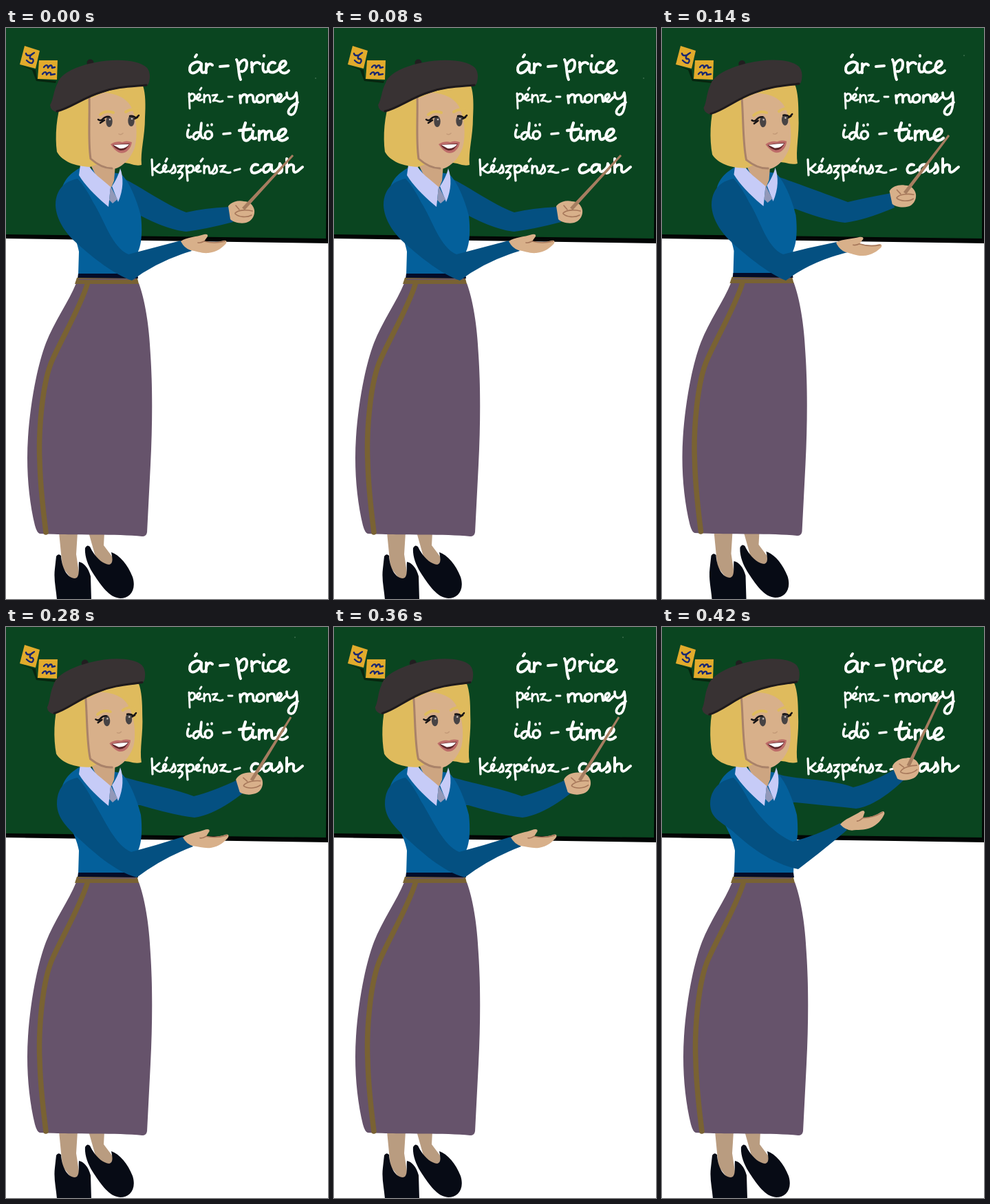
Write an HTML page that moves like this. It is 468 px wide and 830 px high and loops after 0.56 s.

```html
<!DOCTYPE html>
<html lang="hu">
<head>
<meta charset="utf-8">
<title>Vocabulary lesson</title>
<style>
  html, body { margin: 0; width: 100%; height: 100%; overflow: hidden; background: #fff; }
  svg { display: block; width: 100vw; height: 100vh; }
  .ink { fill: none; stroke-linecap: round; stroke-linejoin: round; }
  .chalk { stroke: #fff; }
  .skin { fill: #d8b08a; }
  .sleeve { fill: #045081; }
  .hair { fill: #dfbb5d; }
  .shoe { fill: #070b15; }
</style>
</head>
<body>
<svg viewBox="0 0 468 830" preserveAspectRatio="none">
  <g id="board">
    <path d="M0 0H468V313L0 306Z" fill="#020504"/>
    <path d="M0 0H468L465 306L0 300Z" fill="#0a4520"/>
    <circle id="speck" r=".7" fill="#6f9a7c"/>
    <path d="M20 54L43 61L45 74L73 77L72 80L44 77L38 61Z" fill="#06250f"/>
    <path d="M27 26L49 33L43 59L20 53Z" fill="#e2ab2c"/>
    <path d="M48 47L75 47L74 75L46 74Z" fill="#e2ab2c"/>
    <path class="ink" stroke="#1a2770" stroke-width="2.400" d="M29 37C30 42 37 40 41 36C36 38 33 43 36 45C40 44 41 48 38 51C35 52 32 49 30 47M55 57C58 53 61 53 61 58C64 53 67 53 67 58L71 57M53 67C56 63 59 63 59 68C62 63 66 64 65 68L71 67"/>
  </g>

  <g class="ink chalk" role="img" aria-label="ár – price, pénz - money, idő – time, készpénz - cash">
    <path stroke-width="4" d="M284 52C278 46 266 52 267 61C268 69 280 66 284 53C283 62 284 67 289 64M277 39L275 42M291 52C292 56 290 62 291 65M291 58C293 52 297 51 300 54M311 56L323 55"/>
    <path stroke-width="4" d="M335 46C339 52 337 66 341 75M338 55C342 45 350 43 350 52C350 60 346 64 342 63M357 50L358 64M357 57C360 50 366 48 369 52M374 52C372 62 375 66 380 63M375 40V41M391 51C384 47 379 56 382 62C385 67 393 64 397 59C404 57 410 51 405 48C398 47 395 59 400 64C404 67 409 65 411 62"/>
    <path stroke-width="2.900" d="M266 95L267 117M266 100C270 92 276 96 274 103C272 107 268 107 267 104M276 103C283 102 284 95 280 96C275 98 277 109 285 104M284 87L282 90M288 97V108M288 102C291 96 296 96 296 101L297 108M300 98L307 97L301 106C307 103 310 110 315 106M323 100H329"/>
    <path stroke-width="3.700" d="M340 98L341 109M341 102C344 95 350 95 350 101V108M350 102C353 95 359 96 359 101C359 106 360 110 364 106M370 97C362 98 363 110 370 108C377 106 376 96 370 97M380 98V108M380 102C384 95 390 96 390 101L391 107C401 103 402 96 398 96C393 97 392 108 400 107L406 101M408 94C407 106 418 106 422 94C425 110 421 127 414 126C406 124 412 114 424 108"/>
    <path stroke-width="3.600" d="M265 148C262 156 264 162 269 158M266 141V142M281 152C273 150 269 160 275 162C281 162 284 148 284 138C282 150 282 160 287 160M294 150C287 150 288 163 295 161C302 158 300 150 294 150M293 141V142M299 140V141M316 154L326 153"/>
    <path stroke-width="4.300" d="M348 138C344 148 343 160 347 163C350 165 354 162 356 158M339 149L356 147M359 150C357 158 358 163 363 160M360 141V141.500M368 150V163M368 155C372 148 377 148 377 154V162M377 156C380 148 387 148 386 155C386 162 388 164 393 160C403 158 410 150 405 147C397 146 393 158 397 162C401 165 406 163 409 160"/>
    <path stroke-width="3.200" d="M212 191L213 214M223 198C218 203 215 205 214 205C218 206 221 212 225 210C233 206 235 199 231 199C226 201 228 213 236 208M234 190L232 194M238 209C243 205 244 200 244 199C247 205 248 211 241 211M250 201L258 200L250 210C257 207 259 214 252 219M262 200L264 222M263 204C267 197 274 200 272 206C270 211 265 211 264 208"/>
    <path stroke-width="3.200" d="M274 207C282 205 282 199 279 200C274 202 275 212 283 208M286 190L283 194M288 200V211M288 205C291 199 295 200 295 204L296 211M298 211C303 206 304 201 304 199C308 205 308 211 301 212M311 201L319 200L312 209C319 207 319 212 326 210M332 207L340 205"/>
    <path stroke-width="4" d="M366 199C358 196 354 206 358 210C362 212 368 209 371 206M385 199C376 196 371 206 376 210C382 210 385 203 386 199C385 206 387 211 391 208C397 204 398 200 398 197C402 203 403 210 396 211M408 190V210M408 204C413 196 419 198 418 203C417 210 420 211 424 208L431 202"/>
  </g>

  <path id="backArm" class="sleeve"/>
  <g id="fist">
    <path class="skin" d="M-19 -8C-14 -15 -4 -17 4 -15C12 -15 18 -9 19 -2C20 6 15 14 7 16C-2 18 -12 15 -16 11Z"/>
    <path class="ink" stroke="#a6775a" stroke-width="1.600" d="M-9 2C-4 -3 8 -3 16 -1M-9 3C-4 8 8 9 15 5M-8 -9L-3 -3"/>
  </g>
  <path id="stick" fill="#a67d60"/>

  <g id="body">
    <path fill="#b99c80" d="M77 733H104L102 765L107 798L96 802L82 784Z"/>
    <path fill="#b99c80" d="M120 733H143L142 752L157 772L150 783L131 772Z"/>
    <path class="shoe" d="M73 768Q76 763 80 767C81 786 90 800 100 800C108 799 105 786 106 776C113 777 120 785 123 797L124 831H74C73 816 69 802 71 786Z"/>
    <path class="shoe" d="M115 756Q118 750 122 754C129 769 140 779 150 780C157 778 154 768 153 762C165 766 177 780 184 798C190 817 180 829 166 829C150 828 138 810 128 795C120 783 114 769 115 756Z"/>
    <path fill="#66536b" d="M102 371H193C202 396 208 431 210 475C213 520 213 575 210 635L205 733Q204 739 198 739C160 735 105 738 49 735Q45 734 42 723C33 686 29 640 32 595C35 550 44 495 58 458C70 427 91 398 102 371Z"/>
    <path class="ink" stroke="#796233" stroke-width="7.500" stroke-linecap="butt" d="M118 373C108 405 84 446 68 481C52 515 47 590 49 630C50 672 55 708 58 733"/>
    <path fill="#04609b" d="M108 203C92 212 78 225 80 250C83 282 101 296 106 325L105 359L191 360L192 325C198 312 198 290 196 273C190 250 180 224 167 212Z"/>
    <path fill="#030c29" d="M105 357L191 357L192 364L104 364Z"/>
    <path fill="#796233" d="M103 363L191 364L193 372L100 372Z"/>
    <path class="ink" stroke="#66536b" stroke-width="1.500" d="M106 365.500L188 365"/>
    <path fill="#cda581" d="M116 185H160L157 222L152 234L132 217Z"/>
    <path fill="#c6cbf7" d="M108 199L119 197C125 211 140 220 152 231L149 260C132 246 115 229 106 214Z"/>
    <path fill="#c6cbf7" d="M154 230C159 223 164 213 166 204C171 217 171 235 163 253Z"/>
    <path fill="#9298b8" d="M152 230L162 249L155 255L150 250Z"/>
  </g>

  <g id="head">
    <path class="hair" d="M82 104C73 126 71 158 74 180C82 194 100 201 122 202L150 192L179 197Q190 201 197 199C195 179 202 158 202 130C203 113 203 95 199 84L140 86Z"/>
    <path class="skin" d="M121 103L142 94C156 95 172 99 181 113C190 129 192 155 187 174C180 193 166 204 155 205C143 205 130 198 122 190Z"/>
    <path class="ink" stroke="#a98269" stroke-width="3" d="M121 98C122 130 119 165 123 190C132 198 142 204 154 204"/>
    <path class="ink" stroke="#dfbb5d" stroke-width="4" d="M137 126Q145 119 156 123M174 122Q181 117 190 119"/>
    <ellipse cx="150" cy="136" rx="4.700" ry="8" fill="#474344"/>
    <ellipse cx="182" cy="135" rx="4.700" ry="8" fill="#474344"/>
    <path class="ink" stroke="#171416" stroke-width="2.500" d="M134 133Q138 136 141 132Q145 128 150 129M137 138L143 134M180 128Q185 127 189 131L193 127M187 132L191 130"/>
    <circle cx="151" cy="133" r="1.300" fill="#c8bdb8"/>
    <circle cx="183" cy="132" r="1.300" fill="#c8bdb8"/>
    <path class="ink" stroke="#c39a78" stroke-width="1.500" d="M164 154Q167 156 170 153"/>
    <path fill="#bd6c69" d="M152 169C159 164 166 165 169 166Q175 163 183 166C181 178 172 184 164 181Q158 178 152 169Z"/>
    <path fill="#5e2528" d="M155 170Q169 168 180 168Q175 179 166 178Q159 176 155 170Z"/>
    <path fill="#fff" d="M156 170Q169 169 179 169Q174 176 165 175Z"/>
  </g>
  <g id="beret">
    <circle cx="122.500" cy="50.500" r="5" fill="#211e20"/>
    <path fill="#383233" d="M64 112C69 104 69 91 75 80C80 65 104 55 130 50C160 44 193 46 205 58C209 63 210 70 208 78Q207 85 199 85C169 84 136 92 107 108C93 115 81 120 73 122Q65 120 64 112Z"/>
    <path class="ink" stroke="#1e1a1c" stroke-width="3" d="M74 121C93 117 112 101 139 93C162 85 182 85 204 83"/>
  </g>

  <path id="frontArm" class="sleeve"/>
  <g id="palm">
    <path class="skin" d="M0 0C8 -6 22 -6 34 -10Q40 -11 39 -7L34 0Q50 3 62 -1Q68 -2 66 3C61 9 52 16 40 17C31 18 22 14 14 13Q5 10 0 0Z"/>
    <path class="ink" stroke="#a6775a" stroke-width="1.700" d="M34 0Q49 4 64 0M34 0Q28 3 25 2"/>
  </g>
</svg>
<script>
const STEP = 140;

// back: shoulder, elbow and wrist on the upper edge, then wrist, elbow, armpit below
// front: elbow, lower wrist, upper wrist, inner elbow; under: lower edge below the shoulder
const poses = [
  { shift: [0, 0], head: 0, beret: 0, speck: [450, 73], shoulder: 72, under: 312,
    back: [168, 218, 262, 268, 324, 260, 330, 282, 262, 296, 196, 273],
    fist: [342, 267, 0], tip: [417, 185],
    front: [183, 367, 270, 324, 254, 309, 178, 329], palm: [254, 310, 0] },
  { shift: [-1.5, -1], head: -2.900, beret: -2.500, speck: [439, 40], shoulder: 72, under: 312,
    back: [166, 215, 270, 253, 333, 240, 338, 261, 266, 283, 194, 263],
    fist: [350, 244, -3], tip: [417, 156],
    front: [180, 367, 270, 326, 254, 311, 176, 329], palm: [253, 312, 3] },
  { shift: [0, 0], head: -3.100, beret: -3.100, speck: [420, 15], shoulder: 74, under: 304,
    back: [168, 217, 273, 246, 337, 222, 345, 241, 274, 277, 195, 259],
    fist: [354, 227, -8], tip: [414, 131],
    front: [190, 364, 272, 319, 257, 305, 182, 327], palm: [257, 306, -3] },
  { shift: [0, 0], head: -3.300, beret: -4.200, speck: [-9, -9], shoulder: 70, under: 296,
    back: [170, 214, 278, 233, 338, 207, 352, 222, 282, 264, 194, 255],
    fist: [355, 206, -14], tip: [403, 106],
    front: [198, 352, 269, 295, 259, 285, 190, 312], palm: [259, 287, -16] }
];

const part = id => document.getElementById(id);
const set = (id, name, value) => part(id).setAttribute(name, value);
const place = (id, [x, y, turn = 0]) =>
  set(id, "transform", `translate(${x} ${y}) rotate(${turn})`);

function backArm([sx, sy, ex, ey, wx, wy, vx, vy, lx, ly, ax, ay]) {
  return `M${sx} ${sy}C${sx + 22} ${sy + 8} ${ex - 35} ${ey - 13} ${ex} ${ey}` +
    `Q${ex + 25} ${ey - 6} ${wx} ${wy}L${vx} ${vy}` +
    `Q${lx + 30} ${ly - 4} ${lx} ${ly}Q${lx - 28} ${ly - 3} ${ax} ${ay}L${sx} ${ay}Z`;
}

function frontArm(s, under, [ex, ey, lx, ly, ux, uy, ix, iy]) {
  return `M104 219C83 223 ${s} 237 ${s} 258C${s + 1} 278 ${s + 14} ${under - 14} 102 ${under}` +
    `C126 ${under + 22} 157 ${ey - 9} ${ex} ${ey}Q${ex + 37} ${ey - 28} ${lx} ${ly}` +
    `L${ux} ${uy}Q${ix + 38} ${iy - 10} ${ix} ${iy}` +
    `C${ix - 24} ${iy - 10} 143 279 127 254Q115 230 104 219Z`;
}

// Pointer tapering from the fist to its tip
function stick([fx, fy], [tx, ty]) {
  const x = fx + 3, y = fy - 4;
  const length = Math.hypot(tx - x, ty - y);
  const nx = (ty - y) / length, ny = (x - tx) / length;
  const edge = (px, py, r) => `${px + nx * r} ${py + ny * r}`;
  return `M${edge(x, y, 2.600)}L${edge(tx, ty, 1.500)}L${edge(tx, ty, -1.500)}L${edge(x, y, -2.600)}Z`;
}

let shown = -1;
function draw() {
  const index = Math.floor(performance.now() / STEP) % poses.length;
  if (index !== shown) {
    const p = poses[index];
    shown = index;
    place("body", p.shift);
    set("head", "transform", `rotate(${p.head} 155 200)`);
    set("beret", "transform", `rotate(${p.beret} 155 195)`);
    place("speck", p.speck);
    set("backArm", "d", backArm(p.back));
    place("fist", p.fist);
    set("stick", "d", stick(p.fist, p.tip));
    set("frontArm", "d", frontArm(p.shoulder, p.under, p.front));
    place("palm", p.palm);
  }
  requestAnimationFrame(draw);
}
draw();
</script>
</body>
</html>
```
